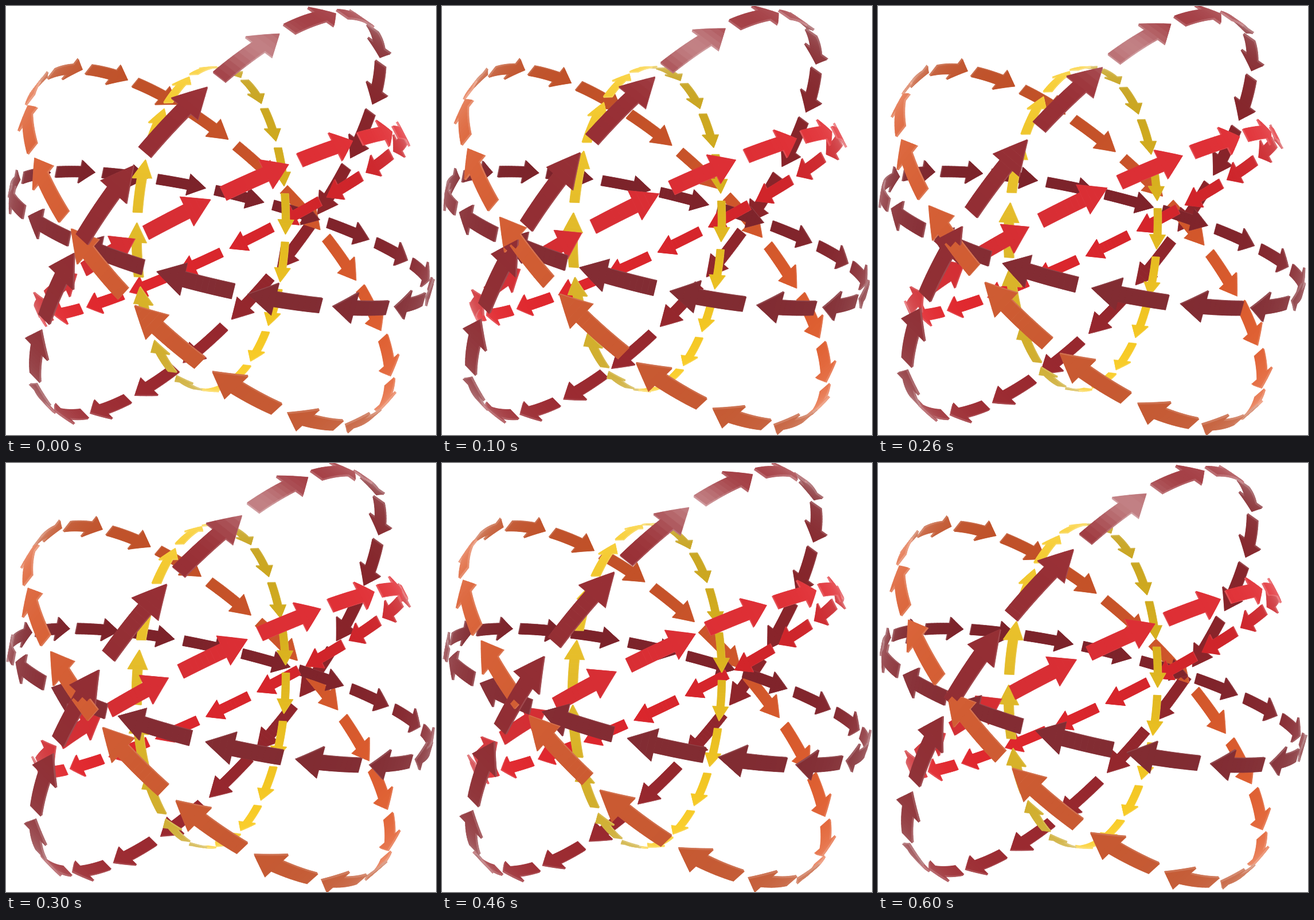
An HTML page with a canvas for the animation above (0.7 s loop, 750 px wide and 747 px high).

```html
<!DOCTYPE html>
<html lang="en">
<head>
<meta charset="utf-8">
<title>Rings of arrows</title>
<style>
html, body { margin: 0; width: 100%; height: 100%; overflow: hidden; background: #fff; }
canvas { display: block; }
</style>
</head>
<body>
<canvas id="stage" width="750" height="747"></canvas>
<script>
const ctx = document.getElementById('stage').getContext('2d');
const COUNT = 18, SPACING = 2 * Math.PI / COUNT;
// Seven held poses; the last one is only half a pose away from the first.
const POSES = 7, HOLD = 100, POSES_PER_SPACING = 6.5;
const LEAD = 8; // ms, so that a repaint just before a change shows the new pose
const CAMERA = 1640, CENTRE = [2, 16, 0];
const DEG = Math.PI / 180;

// Arrow shape: angles behind the tip, sizes as parts of the ring's radius.
const TAIL = 16.8 * DEG, HEAD = 6 * DEG;
const BODY_WIDTH = 0.029, HEAD_WIDTH = 0.063, THICKNESS = 0.004;

const dot = (a, b) => a[0] * b[0] + a[1] * b[1] + a[2] * b[2];
const scale = (a, k) => a.map(v => v * k);
const unit = a => scale(a, 1 / Math.hypot(...a));
const cross = (a, b) => [
  a[1] * b[2] - a[2] * b[1],
  a[2] * b[0] - a[0] * b[2],
  a[0] * b[1] - a[1] * b[0]
];

const HALFWAY = unit([0.12, -0.62, 0.8]); // between the lamp overhead and the viewer

// u and v are the radii at 0 and 90 degrees.
const rings = [
  { rgb: [224, 183, 32], u: [-127, -12, 241], v: [12, -278, -2] },
  { rgb: [141, 37, 43], u: [-203, 29, 351], v: [210, -338, 154] },
  { rgb: [209, 87, 43], u: [-304, -195, 164], v: [-40, -226, -345] },
  { rgb: [128, 36, 43], u: [-291, -22, 224], v: [-208, -110, -291] },
  { rgb: [213, 37, 43], u: [262, -152, 184], v: [170, -37, -305] }
];
for (const ring of rings) {
  ring.axis = scale(unit(cross(ring.u, ring.v)), Math.hypot(...ring.u));
}

function project([x, y, z]) {
  const w = 1 - z / CAMERA;
  return [375 + x / w, 373 + y / w];
}

const radial = (ring, a) =>
  ring.u.map((u, i) => u * Math.cos(a) + ring.v[i] * Math.sin(a));

const place = (ring, a, side, lift) =>
  radial(ring, a).map((r, i) => CENTRE[i] + r * (1 + lift) + ring.axis[i] * side);

function shade(rgb, light, gloss) {
  const c = rgb.map(v => {
    const lit = Math.min(255, v * light);
    return Math.round(lit + (255 - lit) * gloss);
  });
  return `rgb(${c})`;
}

function fill(points, colour) {
  ctx.beginPath();
  for (const p of points) ctx.lineTo(...project(p));
  ctx.closePath();
  ctx.fillStyle = ctx.strokeStyle = colour;
  ctx.fill();
  ctx.stroke();
}

function makeSlice(ring, a, b, wa, wb) {
  const mid = (a + b) / 2, pos = place(ring, mid, 0, 0);
  const out = unit(radial(ring, mid));
  const view = unit([-pos[0], -pos[1], CAMERA - pos[2]]);
  const outer = dot(out, view) > 0 ? 1 : -1;
  const normal = scale(out, outer);
  const light = 1 - 0.12 * normal[1];
  const shine = outer > 0 ? 0.04 + 0.36 * Math.max(0, dot(normal, HALFWAY)) ** 90 : 0;
  const rim = 0.33 * (1 - dot(normal, view)) ** 3;
  const gloss = shine + rim;
  return {
    ring, a, b, wa, wb, outer,
    depth: pos[2],
    face: shade(ring.rgb, light, gloss),
    edge: shade(ring.rgb, light, gloss + 0.13)
  };
}

function drawSlice({ ring, a, b, wa, wb, outer, face, edge }) {
  const near = THICKNESS * outer, far = -near;
  const sheet = lift => [
    place(ring, a, -wa, lift), place(ring, b, -wb, lift),
    place(ring, b, wb, lift), place(ring, a, wa, lift)
  ];
  const wall = s => [
    place(ring, a, s * wa, far), place(ring, b, s * wb, far),
    place(ring, b, s * wb, near), place(ring, a, s * wa, near)
  ];
  fill(sheet(far), edge);
  fill(wall(-1), edge);
  fill(wall(1), edge);
  fill(sheet(near), face);
}

function addArrow(slices, ring, tip) {
  const add = (from, to, parts, width) => {
    for (let i = 0; i < parts; i++) {
      const at = k => from + (to - from) * k / parts;
      slices.push(makeSlice(ring, tip - at(i), tip - at(i + 1), width(at(i)), width(at(i + 1))));
    }
  };
  add(TAIL, HEAD, 8, () => BODY_WIDTH);
  add(HEAD, 0, 4, d => HEAD_WIDTH * d / HEAD);
}

function draw(time) {
  const pose = Math.floor((time + LEAD) / HOLD) % POSES;
  const turn = pose / POSES_PER_SPACING, slices = [];
  for (const ring of rings)
    for (let i = 0; i < COUNT; i++) addArrow(slices, ring, (i + turn) * SPACING);
  slices.sort((p, q) => p.depth - q.depth);
  ctx.fillStyle = '#fff';
  ctx.fillRect(0, 0, 750, 747);
  ctx.lineWidth = 0.6;
  ctx.lineJoin = 'round';
  slices.forEach(drawSlice);
}

const start = performance.now();
function tick() {
  draw(performance.now() - start);
  requestAnimationFrame(tick);
}
tick();
</script>
</body>
</html>
```
